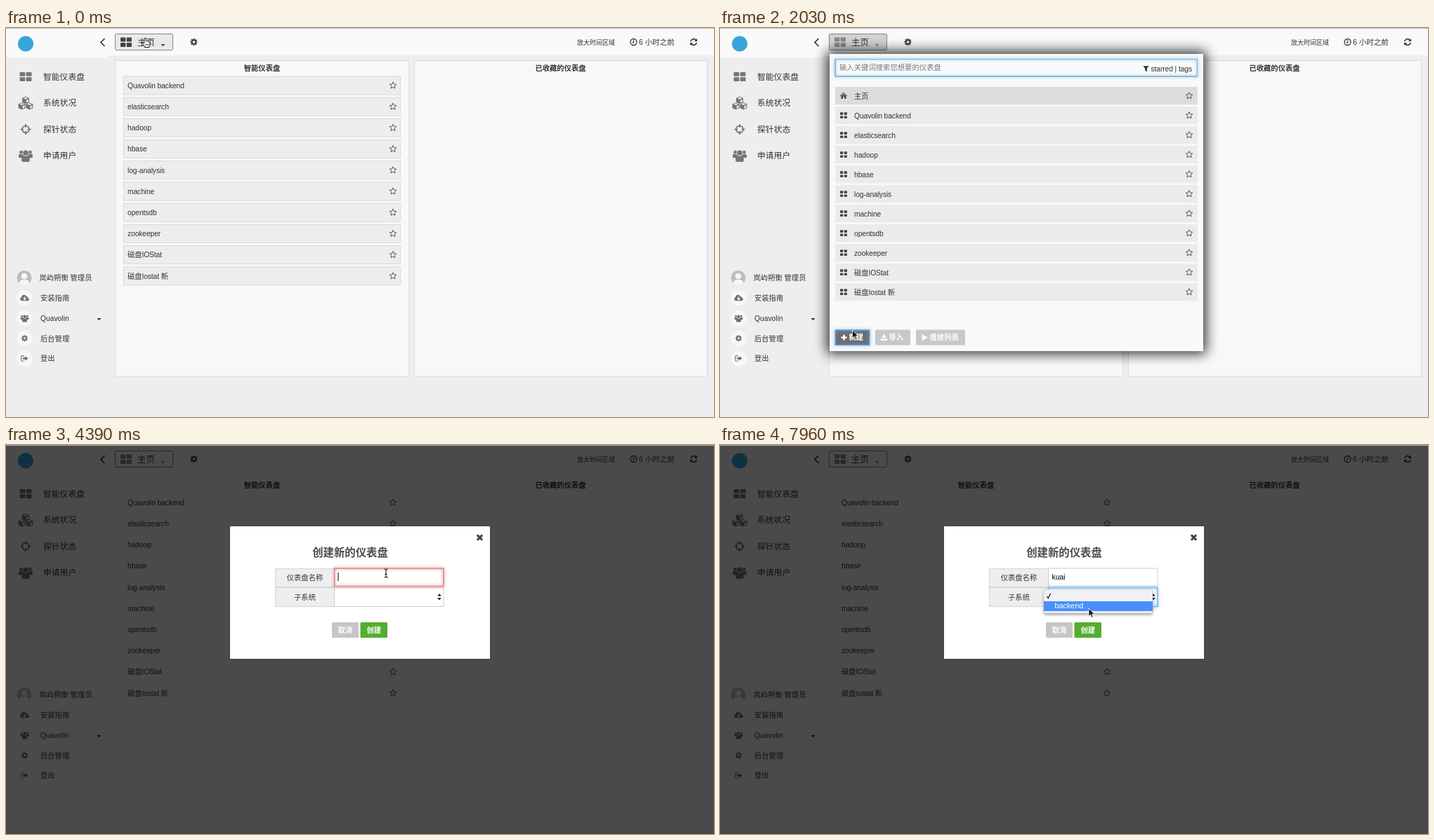
These frames come from a looping animation (1008x555 px, 8 s). An HTML page:

```html
<!DOCTYPE html>
<html lang="zh-CN">
<head>
<meta charset="utf-8">
<title>Dashboard</title>
<style>
html, body { margin: 0; width: 100%; height: 100%; overflow: hidden; background: #eee; }
svg { display: block; width: 1008px; height: 555px; }
text { font-family: "Liberation Sans", "Noto Sans CJK SC", "Noto Sans CJK", sans-serif; white-space: pre; }
.list { letter-spacing: -.1px; }
.dim .surface { fill: #f8f8f8; stroke: none; }
.dim #tab { fill: #f8f8f8; }
</style>
</head>
<body>
<svg id="stage" viewBox="0 0 1008 555" xmlns="http://www.w3.org/2000/svg"></svg>
<script>
const LOOP = 8000;
const BRAND = 'Quavolin', TEAM = '岚屿朔衡', TYPED = 'kuai';
const boards = [BRAND + ' backend', 'elasticsearch', 'hadoop', 'hbase', 'log-analysis',
  'machine', 'opentsdb', 'zookeeper', '磁盘IOStat', '磁盘Iostat 新'];

// Drawing helpers
const rect = (x, y, w, h, fill, attr = '') =>
  `<rect x="${x}" y="${y}" width="${w}" height="${h}" fill="${fill}" ${attr}/>`;
const circle = (x, y, r, fill, attr = '') => `<circle cx="${x}" cy="${y}" r="${r}" fill="${fill}" ${attr}/>`;
const text = (x, cy, str, size = 10.3, attr = '') =>
  `<text x="${x}" y="${cy + size * .37}" font-size="${size}" ${attr}>${str}</text>`;
const path = (d, attr = '') => `<path d="${d}" ${attr}/>`;
const at = (x, y, body, scale = 1, attr = '') =>
  `<g transform="translate(${x} ${y}) scale(${scale})" ${attr}>${body}</g>`;
const group = (id, body, attr = '') => `<g id="${id}" ${attr}>${body}</g>`;
const BOLD = 'font-weight="700"';
const MID = 'text-anchor="middle"';

// Icons, centred on 0,0
const tiles = (w, h) => [[-w, -h], [.7, -h], [-w, .7], [.7, .7]]
  .map(([x, y]) => rect(x, y, w - .7, h - .7, 'currentColor', 'rx="1"')).join('');
const cog = circle(0, 0, 3, 'none', 'stroke="currentColor" stroke-width="2.4"') +
  circle(0, 0, 4.6, 'none', 'stroke="currentColor" stroke-width="1.7" stroke-dasharray="1.9 1.713" stroke-dashoffset=".95"');
const person = (x, y, s) => at(x, y, circle(0, -4.2, 3.3, 'currentColor') +
  path('M-5 5.5V3Q-5-.8-2.4-.8Q0 1 2.4-.8Q5-.8 5 3V5.5Q5 7 3.5 7H-3.5Q-5 7-5 5.5Z'), s);
const users = person(-6.4, -1.8, .72) + person(6.4, -1.8, .72) +
  at(0, 1, circle(0, -4.2, 4.6, 'var(--back)') + person(0, 0, 1.15));
const cube = (x, y) => at(x, y,
  path('M0-5L5-3V3L0 5.4L-5 3V-3Z', 'fill="currentColor"') +
  path('M-3.6-2.6L0-1.1L3.6-2.6L0-3.9Z M1 .4L3.9-.9V2.3L1 3.7Z', 'fill="#eee"'));
const cubes = cube(0, -4.3) + cube(-5.4, 4.2) + cube(5.4, 4.2);
const crosshair = circle(0, 0, 5, 'none', 'stroke="currentColor" stroke-width="1.7"') +
  path('M0-7.6V-2.6M0 7.6V2.6M-7.6 0H-2.6M7.6 0H2.6', 'stroke="currentColor" stroke-width="1.7"');
const cloud = path('M-4 4Q-6.5 3.6-6.4 1.3Q-6.2-.8-4.3-1.1Q-4-4.5-.8-4.5Q1.6-4.5 2.4-2.3Q4.6-2.4 4.7-.2Q6.5.4 6.4 2Q6 4 4 4Z') +
  path('M-.9-1.6H.9V.6H2.6L0 3.1L-2.6.6H-.9Z', 'fill="#f8f8f8"');
const signOut = path('M-1-4H-3.4Q-5-4-5-2.4V2.4Q-5 4-3.4 4H-1', 'fill="none" stroke="currentColor" stroke-width="1.2"') +
  path('M-2.4-1.5H.9V-3.6L5.2 0L.9 3.6V1.5H-2.4Z');
const starPoints = Array.from({ length: 10 }, (_, i) => {
  const r = i % 2 ? 2.4 : 5, a = i * Math.PI / 5;
  return (r * Math.sin(a)).toFixed(2) + ',' + (-r * Math.cos(a)).toFixed(2);
}).join(' ');
const star = `<polygon points="${starPoints}" fill="none" stroke="#444" stroke-width=".9" stroke-linejoin="round"/>`;
const home = path('M0-4.6L5.2 0L4.5.8L0-3.1L-4.5.8L-5.2 0Z M-3.5.9L0-2.1L3.5.9V4.2H1V1.4H-1V4.2H-3.5Z');
const funnel = path('M-4-4.2H4L1.3-.7V4.2L-1.3 2V-.7Z');
const plus = path('M-1.2-4H1.2V-1.2H4V1.2H1.2V4H-1.2V1.2H-4V-1.2H-1.2Z');
const importIcon = path('M-1.3-4.5H1.3V-1.4H3.6L0 2L-3.6-1.4H-1.3Z M-4.7 1.6H-2.2L0 3.4L2.2 1.6H4.7V4.5H-4.7Z');
const play = path('M-3.8-4.4L4.4 0L-3.8 4.4Z');
const down = path('M-3-1.5H3L0 1.7Z');
const clock = circle(0, 0, 4.5, 'none', 'stroke="currentColor" stroke-width="1.3"') +
  path('M.2-2.7V.6H-2', 'fill="none" stroke="currentColor" stroke-width="1.1"');
const refresh = path('M-4.3-.8A4.4 4.4 0 0 1 3.4-2.7M4.3.8A4.4 4.4 0 0 1-3.4 2.7',
  'fill="none" stroke="currentColor" stroke-width="1.6"') + path('M5-5V-.9H.9Z M-5 5V.9H-.9Z');
const close = path('M-3.6-3.6L3.6 3.6M3.6-3.6L-3.6 3.6', 'stroke="#444" stroke-width="3"');

const glow = (id, x, y, w, h, color) => group(id,
  rect(x, y, w, h, 'none', `stroke="${color}" stroke-width="2.6" opacity=".6" filter="url(#soft)"`) +
  rect(x, y, w, h, 'none', `stroke="${color}" stroke-width="1.1"`));

function page() {
  const sideMenu = [['智能仪表盘', tiles(8.5, 6.5)], ['系统状况', cubes], ['探针状态', crosshair], ['申请用户', users]]
    .map(([label, icon], i) => {
      const y = 69.5 + i * 37.5;
      return at(28, y, icon, 1, 'color="#757575" fill="#757575" style="--back:#eee"') + text(53, y, label, 11.8);
    }).join('');

  const account = [['安装指南', cloud, 1], [BRAND, users, .6], ['后台管理', cog, .85], ['登出', signOut, .95]]
    .map(([label, icon, s], i) => {
      const y = 385.3 + i * 28.7;
      return circle(26.5, y, 11, '#f8f8f8', 'class="surface"') +
        at(26.5, y, icon, s, 'color="#707070" fill="#707070" style="--back:#f8f8f8"') + text(49, y, label);
    }).join('');

  const rows = boards.map((name, i) => {
    const y = 82 + i * 30.2;
    return rect(167.5, y - 13, 394, 26, '#ededed', 'stroke="#d9d9d9" class="surface"') +
      text(173, y, name, 10.3, 'class="list"') + at(551, y, star);
  }).join('');

  return rect(0, 0, 1008, 555, '#eee', 'class="surface"') +
    rect(0, 0, 1008, 39, '#f9f9f9', 'class="surface"') +
    rect(0, 0, 144, 42, '#fafafa', 'class="surface"') +
    circle(28, 22.5, 11, '#36a5da') +
    path('M140.5 15L135 20.5L140.5 26', 'fill="none" stroke="#333" stroke-width="1.7"') +
    rect(155.5, 8.5, 82, 23, '#e9e9e9', 'id="tab" rx="1" stroke="#858585"') +
    group('tabIcon', at(171, 20.3, tiles(8, 6.8)) + at(223.5, 24.5, down)) +
    text(187, 20.5, '主页', 12.5) +
    at(267.5, 20, cog, .95, 'color="#444"') +
    text(813, 20.5, '放大时间区域', 9) +
    at(893.5, 20, clock, 1, 'color="#333"') + text(901, 20.5, '6 小时之前', 10.5) +
    at(979, 20, refresh, 1, 'color="#333"') +
    sideMenu +
    circle(26, 356.5, 10.5, '#bdbdbd') + circle(26, 354, 4.3, '#f6f6f6') +
    path('M18.5 363.5Q19.5 359.5 24 359H28Q32.500 359.500 33.500 363.500Q30 367 26 367Q22 367 18.500 363.500Z', 'fill="#f6f6f6"') +
    text(47.500, 356.500, TEAM + ' 管理员') + account + at(132.500, 415.500, down) +
    rect(155.5, 46.5, 418, 450.5, '#f8f8f8', 'stroke="#dadada" class="surface"') +
    rect(581.5, 46.5, 417, 450.5, '#f8f8f8', 'stroke="#dadada" class="surface"') +
    text(364.5, 57.5, '智能仪表盘', 10.3, BOLD + MID.padStart(MID.length + 1)) +
    text(789.5, 57.5, '已收藏的仪表盘', 10.3, `${BOLD} ${MID}`) + rows;
}

function searchPanel() {
  const rows = ['主页', ...boards].map((name, i) => {
    const y = 96.7 + i * 28;
    return rect(164, y - 12.7, 516, 25.4, i ? '#ebebeb' : '#dcdcdc', 'class="surface"') +
      at(176, y, i ? tiles(5, 4.4) : home, 1, 'color="#444" fill="#444"') +
      text(191, y, name, 10.3, 'class="list"') + at(668, y, star);
  }).join('');
  const buttons = [[164, 49, plus, '新建'], [221, 50, importIcon, '导入'], [279, 70, play, '播放列表']]
    .map(([x, w, icon, label], i) =>
      rect(x, 430.5, w, 22, '#c8c8c8', `rx="1.5" ${i ? '' : 'id="newButton"'}`) +
      at(x + 12.5, 441.5, icon, 1, 'fill="#fff"') +
      text(x + 19.5, 441.5, label, 10.3, `fill="#fff" ${BOLD}`)).join('');
  return rect(152, 33, 540, 432, '#000', 'rx="4" opacity=".8" filter="url(#shade)"') +
    rect(156, 37, 532, 424, '#f9f9f9', 'class="surface"') +
    rect(164, 44.5, 515.5, 24.5, '#fafafa', 'rx="1" stroke="#888"') +
    glow('searchGlow', 164, 44.5, 515.5, 24.5, '#72b5ea') +
    text(170, 56.5, '输入关键词搜索您想要的仪表盘', 10.35, 'fill="#777"') +
    rect(170.5, 51, 1, 12, '#222', 'id="searchCaret"') +
    at(606.5, 58.5, funnel) + text(613.5, 58.5, 'starred | tags', 10.3, 'class="list"') +
    group('results', rows) + buttons + glow('buttonGlow', 164, 431, 49, 21.5, '#5aa9ee');
}

function dialog() {
  const line = 'stroke="#ccc"';
  return rect(319, 116, 370, 189, '#fff') + at(674.5, 132, close) +
    text(490, 153, '创建新的仪表盘', 15.4, `fill="#4a4a4a" ${BOLD} ${MID}`) +
    rect(383.5, 176.5, 84, 26, '#eee', 'stroke="#d5d5d5"') + text(425.5, 189.5, '仪表盘名称', 10.3, MID) +
    rect(383.5, 203.5, 84, 27, '#eee', 'stroke="#d5d5d5"') + text(425.5, 217, '子系统', 10.3, MID) +
    rect(467.5, 176, 155.5, 25.5, '#fff', line) + rect(467.5, 203.5, 155.5, 27, '#fff', line) +
    glow('blueGlow', 467.7, 176, 155.3, 25.5, '#7dbcee') + glow('redGlow', 467.7, 176, 155.3, 25.5, '#e9625e') +
    glow('selectGlow', 467.7, 203.7, 155.3, 26.8, '#62aef0') +
    rect(473, 182, 51.5, 12, '#b3d7fe', 'id="selection"') +
    text(472.5, 188, '', 10.4, 'id="field" fill="#000"') +
    rect(472.5, 182, 1, 12, '#000', 'id="caret"') +
    path('M614.2 215.500L617 212L619.800 215.500Z M614.200 218L617 221.500L619.800 218Z', 'fill="#222"') +
    rect(464, 253, 38, 22, '#c6c6c6', 'rx="1.5"') + rect(504.5, 253, 38.500, 22, '#55ad2f', 'rx="1.5"') +
    text(483, 264, '取消', 10.3, `fill="#fff" ${BOLD} ${MID}`) +
    text(523.7, 264, '创建', 10.3, `fill="#fff" ${BOLD} ${MID}`) +
    group('menu',
      rect(461, 209, 155, 33, '#000', 'rx="3" opacity=".4" filter="url(#soft)"') +
      rect(460.7, 206, 155.3, 34, '#f1f1f1', 'rx="3" stroke="#bbb" stroke-width=".5"') +
      rect(461, 209, 155, 14, '#4890fb', 'id="pick"') +
      path('M465.500 216L467.300 218.500L470.500 212', 'id="check" fill="none" stroke-width="1.4"') +
      text(476.5, 229.5, 'backend', 10.8, 'id="option"'));
}

const pointers =
  group('arrow', path('M0 0V11.500L2.600 9.100L4.400 13.200L6.300 12.400L4.600 8.400H8Z',
    'fill="#111" stroke="#fff" stroke-width=".8"')) +
  group('beam', path('M-2.800-6Q0-6 0-4.500Q0-6 2.800-6M0-4.500V4.500M-2.800 6Q0 6 0 4.500Q0 6 2.800 6M-1.500 1.500H1.500',
    'fill="none" stroke="#111" stroke-width="1.1"')) +
  group('hand', path('M-1.200 1Q-1.200-.4 0-.4Q1.200-.4 1.200 1V4.200Q2.700 3.600 3.200 4.700Q4.600 4.200 5.100 5.300Q7 5 7 6.800V8.800Q7 10.500 6 11.500V13H-.5V11.800L-4 7.600Q-4.500 6.200-3 6.100L-1.200 7.500Z',
    'fill="#fff" stroke="#111" stroke-width="1"') + path('M1.200 8V10.500M3 8V10.500M4.800 8V10.500', 'stroke="#111" stroke-width=".8"'));

const stage = document.getElementById('stage');
stage.innerHTML = `<defs>
  <filter id="shade" x="-20%" y="-20%" width="140%" height="140%"><feGaussianBlur stdDeviation="9"/></filter>
  <filter id="soft" x="-20%" y="-60%" width="140%" height="220%"><feGaussianBlur stdDeviation="2"/></filter>
</defs>` +
  group('scene', page() + group('panel', searchPanel()), 'color="#333" fill="#333"') +
  group('modal', rect(0, 0, 1008, 555, '#000', 'opacity=".7"') + group('dialog', dialog(), 'fill="#333"')) +
  rect(0, 0, 1008, 1, '#b4b4b4') + group('pointer', pointers);

const el = {};
stage.querySelectorAll('[id]').forEach(node => el[node.id] = node);

// Pointer moves: start, end, steps, target x, target y
const moves = [
  [630, 1220, 7, 190, 407], [1490, 1580, 2, 188.5, 431], [2420, 2950, 7, 525, 167],
  [3220, 3220, 1, 525, 177], [3310, 3780, 6, 541, 183], [6360, 6530, 3, 541, 204],
  [7160, 7600, 6, 525, 221], [7690, 7690, 1, 525, 232], [7960, 7960, 1, 525, 233]
];

const clamp = v => Math.max(0, Math.min(1, v));
const ramp = (t, start, span = 200) => clamp((t - start) / span);
const within = (t, a, b) => t >= a && t < b;
const show = (node, on) => node.setAttribute('display', on ? 'inline' : 'none');
const fade = (node, v) => node.setAttribute('opacity', v);

function pointerAt(t) {
  let x = 198, y = 14.5;
  for (const [start, end, n, toX, toY] of moves) {
    if (t < start) break;
    const k = n > 1 ? Math.floor((t - start + 1) / ((end - start) / (n - 1))) + 1 : 1;
    const p = clamp(k / n), e = p * p * (3 - 2 * p);
    x += (toX - x) * e;
    y += (toY - y) * e;
  }
  return [x, y];
}

function pointerKind(t, x, y) {
  if (t >= 2120) return x > 468 && within(y, 176, 202) ? 'beam' : 'arrow';
  if (y < 32 || within(y, 84, 390)) return 'hand';
  return within(y, 44, 69) ? 'beam' : 'arrow';
}

function draw(t) {
  const [x, y] = pointerAt(t), kind = pointerKind(t, x, y);
  el.pointer.setAttribute('transform', `translate(${x} ${y})`);
  for (const name of ['arrow', 'beam', 'hand']) show(el[name], name === kind);

  const open = within(t, 270, 3220), dim = t >= 2120;
  el.scene.setAttribute('class', dim ? 'dim' : '');
  el.tab.setAttribute('fill', open ? '#d2d2d2' : '#e9e9e9');
  el.tabIcon.setAttribute('color', y < 32 ? '#444' : '#888');
  el.tabIcon.setAttribute('fill', y < 32 ? '#444' : '#888');

  show(el.panel, open);
  show(el.results, t >= 450);
  fade(el.searchGlow, dim ? 0 : ramp(t, 540));
  show(el.searchCaret, within(t, 630, 1130) || within(t, 1580, 2030));
  el.newButton.setAttribute('fill', within(t, 1580, 2420) ? '#6c6c6c' : '#c8c8c8');
  show(el.buttonGlow, within(t, 2030, 2120));

  show(el.modal, dim);
  const focus = t < 3220 ? 0 : .4 + .6 * ramp(t, 3220, 90);
  const invalid = ramp(t, 4220) - ramp(t, 5110);
  fade(el.blueGlow, focus * (1 - invalid) * (1 - ramp(t, 6800)));
  fade(el.redGlow, invalid);
  fade(el.selectGlow, ramp(t, 6750));

  const typed = TYPED.slice(0, Math.max(0, Math.floor((t - 5110) / 90) + 1));
  const value = t < 4220 ? '新的仪表盘' : typed;
  if (el.field.textContent !== value) el.field.textContent = value;
  show(el.selection, within(t, 4050, 4220));
  show(el.caret, within(t, 3220, 3690) || within(t, 4220, 4660) || within(t, 5110, 5820) || within(t, 6360, 6800));
  if (dim) el.caret.setAttribute('x', 472.5 + (t < 4220 ? 0 : el.field.getComputedTextLength()));

  const second = y > 223;
  show(el.menu, t >= 6890);
  el.pick.setAttribute('y', second ? 223 : 209);
  el.check.setAttribute('stroke', second ? '#222' : '#fff');
  el.option.setAttribute('fill', second ? '#fff' : '#222');
}

function tick() {
  draw(performance.now() % LOOP);
  requestAnimationFrame(tick);
}
tick();
</script>
</body>
</html>
```
